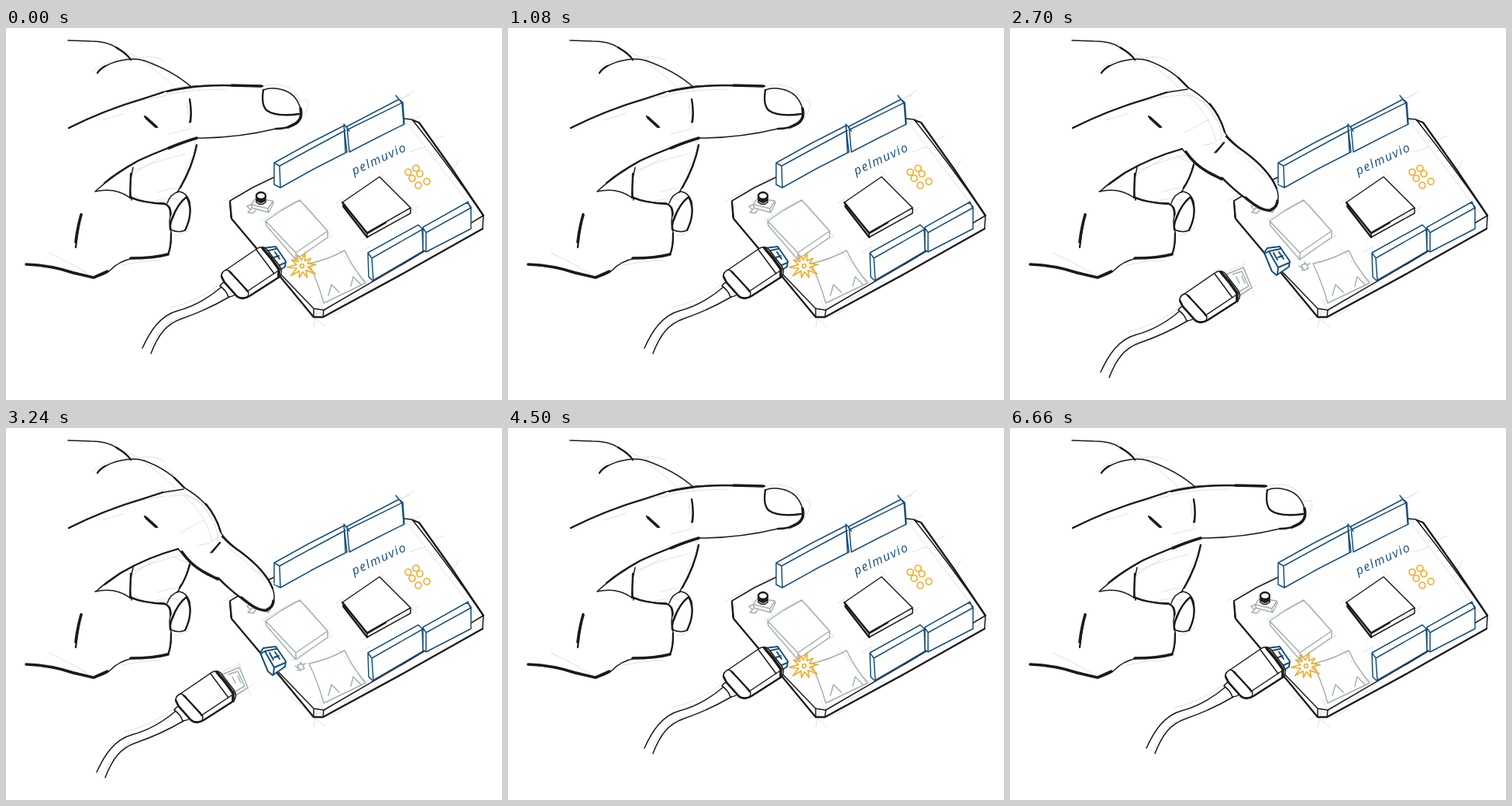
An HTML page for the animation above (8.1 s loop, 640 by 480 pixels).

```html
<!DOCTYPE html>
<html lang="en">
<head>
<meta charset="utf-8">
<title>Hold the button while plugging in</title>
<style>
html, body { margin: 0; width: 100%; height: 100%; overflow: hidden; background: #fff; }
svg { display: block; width: 100%; height: 100%; }
path, circle, ellipse { fill: none; stroke-linecap: round; stroke-linejoin: round; }
.ink { stroke: #1c1a1b; stroke-width: 1.5; }
.bold { stroke: #1c1a1b; stroke-width: 2.3; }
.heavy { stroke: #1c1a1b; stroke-width: 3.6; }
.blue { stroke: #174f7c; stroke-width: 1.5; }
.gray { stroke: #a3b0b0; stroke-width: 1.5; }
.gold { stroke: #f3ae2d; stroke-width: 1.7; }
.pencil { stroke: #dedede; stroke-width: .9; }
.paper { fill: #fff; }
text { font: italic 500 16px "Open Sans", sans-serif; letter-spacing: 1.5px; fill: #174f7c; }
</style>
</head>
<body>
<svg viewBox="0 0 640 480">
  <g id="board">
    <path class="pencil" d="M281 223L351 187M501 98L527 81M505 91L521 87M515 119L619 256M509 128L535 113M573 193L584 170M521 160L541 153M548 146L564 139M600 258L621 246M607 225L617 247M365 344L397 372M389 365L412 386M403 360L397 386M386 376L412 364M411 374L437 363M331 248L373 223M386 227L420 269M368 300L421 268M426 226L437 219M481 184L530 240M459 274L490 257M505 246L531 231M427 284L471 335M456 289L470 282M459 325L481 329M404 351L409 364M434 354L469 336M532 292L546 286"/>
    <path class="ink" d="M347 192L318 206L289 223L290 244M346 309L397 362L410 364L513 304L616 242L615 259M410 364L409 373M397 362V373M514 117L524 118Q571 177 616 242"/>
    <path class="bold" d="M289 224L291 246L344 309L397 373L409 373L512 317L615 259M525 119L533 122L575 181L616 242"/>

    <path class="blue paper" d="M346 174L391 149L436 126L440 160L397 182L354 206L346 202ZM346 174L353 178L354 206M353 178L397 154L438 132M436 125L438 160M440 127L507 92L512 96L514 124L478 142L443 160ZM441 131L512 96M503 87L511 97L513 123M436 124L443 133"/>
    <path class="blue paper" d="M467 290L532 254L537 259L538 288L473 326L468 321ZM467 290L472 297L474 326M472 297L537 260M538 257L595 225L600 231L600 259L542 289L538 286ZM538 258L542 264L542 288M542 264L600 232M596 224L600 234"/>

    <text transform="translate(449 190) rotate(-25)">pelmuvio</text>

    <g class="gold">
      <circle cx="519" cy="186" r="4"/><circle cx="529" cy="181" r="4"/>
      <circle cx="524" cy="194" r="4"/><circle cx="534" cy="188" r="4"/>
      <circle cx="532" cy="203" r="4"/><circle cx="543" cy="198" r="4"/>
    </g>

    <path class="gray" d="M335 249L356 235L379 222L415 262L374 290ZM335 250L336 255L374 299L374 290M374 299L415 270V262"/>
    <path class="ink" d="M434 225L482 192L522 232L466 264ZM434 225L437 233L466 270L522 239V232M466 264V270"/>
    <path class="bold" d="M434 225L466 265L490 251M435 230L466 270"/>
    <path class="gray" d="M391 304Q415 299 437 287Q447 309 464 329L410 355Q403 329 391 304M416 345L420 331L430 341M445 333L448 321L458 331"/>

    <path class="gray" d="M317 227L322 220L344 223L345 226L339 238L317 232ZM318 228L338 233L344 224M338 233V237M316 228L311 230L315 234M318 232L312 238L319 239L322 235"/>
    <path class="ink paper" d="M323 218V225Q329 230 335 225V218"/>
    <ellipse class="bold paper" cx="329" cy="216.500" rx="6" ry="4.500"/>
    <path class="heavy" d="M324.500 222Q329 226 333.500 222"/>

    <g class="blue" style="stroke-width:2">
      <path class="paper" d="M328 290L332 284L348 282L361 301L360 308L344 319L338 314Z"/>
      <path d="M329 291L334 288L349 285M334 288L346 309L360 303M346 309L345 318M340 290L345 299M347 289L353 298M346 296L352 294"/>
    </g>
  </g>

  <path id="lamp" class="gray" d="M376 306L382 304L385 310L379 313ZM373 307L377 310M380 302V305M384 305L387 304M376 313L379 311"/>

  <g id="glow" class="gold">
    <path id="spark" class="paper"/>
    <circle cx="382" cy="307" r="2.500" fill="#f3ae2d"/>
  </g>

  <g id="plug">
    <g id="tip">
      <path class="pencil" d="M328 286L362 274M352 318L377 300M359 271L374 313"/>
      <path class="gray paper" d="M338 287L360 278L371 304L352 316ZM346 287L358 283L367 302L355 309M351 290L355 298M358 289L362 298"/>
    </g>
    <path class="pencil" d="M212 361Q247 353 275 331M294 349L315 335M187 411Q203 378 231 371"/>
    <path class="ink" d="M277 335Q251 357 221 365C199 371 186 391 176 413M187 420C196 397 206 382 227 375Q259 364 288 347"/>
    <path class="ink paper" d="M276 333Q281 325 294 324L301 338Q297 346 287 347Q284 338 276 333M284 328Q292 333 296 344"/>
    <path class="ink paper" d="M278 322Q277 315 284 312L325 284Q331 281 336 285L353 307Q358 315 353 321L314 346Q304 352 298 347L281 328Z"/>
    <path class="ink" d="M284 312Q290 313 293 319L311 338Q315 342 311 348M311 340L350 314M323 286L346 317"/>
    <path class="bold" d="M278 320L282 328L298 346Q304 351 314 346L353 321M288 314Q299 325 312 340"/>
    <path class="heavy" d="M331 284Q342 296 352 311L352 321"/>
  </g>

  <g id="hand">
    <path class="pencil" d="M140 27Q161 31 173 40M162 41Q190 32 204 43M177 43Q201 59 221 80M111 57Q130 38 168 42M149 101Q179 91 205 88M124 119L152 110M165 184Q201 169 231 163M164 189Q180 177 198 168M196 212Q215 205 225 207M186 226Q205 216 222 222M218 267Q228 270 239 256M150 306Q178 300 200 300M55 290Q85 304 106 317M166 216Q178 225 193 227"/>
    <path class="ink" d="M80 16L109 17Q130 17 142 25Q157 34 161 41M118 58Q126 47 148 42Q164 38 178 42M81 129Q132 104 174 92L203 83"/>
    <path class="bold" d="M118 58Q121 53 128 49M142 25Q156 33 161 41M81 129Q124 107 178 91L202 83"/>
    <path class="ink" d="M115 211C133 207 149 211 160 219Q177 226 204 226Q213 229 213 240Q209 248 213 263Q214 281 209 292Q190 297 164 297Q145 301 134 313Q125 320 113 322Q71 309 26 305M164 180Q158 204 162 222"/>
    <path class="bold" d="M160 218Q178 226 205 227Q213 230 212 242M213 265Q213 284 209 292M161 188L160 219M179 114Q187 121 195 128M97 240Q92 262 90 283"/>
    <path class="heavy" d="M26 305Q58 306 87 316L113 322L131 314M97 241Q92 258 90 276M209 292Q191 297 161 297M181 116L193 127"/>
    <path class="ink" d="M208 226Q212 214 223 211Q233 212 237 224Q240 243 231 261Q222 265 212 260M233 218Q222 226 215 246Q211 253 213 260"/>
    <path class="bold" d="M233 218Q243 237 231 261M233 218Q222 226 214 246Q211 254 212 260"/>
  </g>

  <g id="raised">
    <path class="pencil" d="M203 87Q239 79 283 79M331 75Q350 70 365 77Q374 82 379 93M376 95L388 93Q394 102 382 116M334 80Q347 72 374 90M210 137L238 130M233 96L237 126M215 78L247 73M348 132Q365 129 375 124M231 184Q244 164 244 146"/>
    <path class="ink" d="M178 42Q215 55 239 76M201 83Q232 74 271 74L331 75M237 92Q240 108 237 122M332 80Q341 76 354 79Q374 83 380 104Q383 116 375 123Q365 130 348 130Q299 142 246 142Q208 154 171 171Q138 190 116 210M246 151Q241 178 221 212"/>
    <path class="bold" d="M208 82Q243 74 280 74L331 75M237 92Q240 108 238 121M332 80Q329 99 336 106Q348 115 378 111M246 142Q208 154 171 171Q142 187 127 200M246 151Q241 178 225 206M375 123Q365 130 348 130"/>
    <path class="heavy" d="M380 104Q383 117 374 123L364 128M246 142Q226 148 210 155M291 74L329 75"/>
  </g>

  <g id="pressing">
    <path class="paper" d="M222 156L229 78Q268 101 277 134L303 160Q338 188 344 207Q349 222 340 233Q330 239 318 230L274 195Z"/>
    <path class="pencil" d="M202 80Q225 80 242 91Q274 113 273 148M211 88Q251 80 265 119M229 86Q258 111 266 145M225 135L257 118M249 151Q267 151 277 136M286 154Q319 178 336 199M328 188L349 203M316 181L331 190M216 165Q225 173 238 174M204 49L222 65"/>
    <path class="ink" d="M178 42Q211 54 230 77Q268 99 277 134Q281 143 303 160Q337 186 344 207Q350 223 339 234Q329 238 317 229Q295 215 274 193Q256 195 222 156Q182 167 148 187Q130 198 116 211M276 148L264 161M237 175Q233 194 221 212M203 83L229 79"/>
    <path class="bold" d="M217 64L230 77M258 98Q271 114 277 134M279 140Q289 151 303 160Q335 184 344 207M237 177Q232 195 224 206M222 156Q182 167 148 187L127 202M276 148L266 160M274 194Q294 214 317 229"/>
    <path class="heavy" d="M227 160Q238 176 254 185L273 195M304 219Q325 237 336 235Q345 231 345 223"/>
  </g>
</svg>
<script>
const LOOP = 8100;
const byId = id => document.getElementById(id);
const show = (id, on) => byId(id).setAttribute("visibility", on ? "visible" : "hidden");

// Hand-drawn star: spikes of uneven length around the status light.
const points = Array.from({ length: 20 }, (_, i) => {
  const radius = i % 2 ? 7.5 : 17.5 + 2.5 * Math.sin(i * 2.3);
  const angle = i * Math.PI / 10 - 1.35;
  return [382 + radius * Math.cos(angle), 307 + radius * Math.sin(angle)].map(n => n.toFixed(1));
});
byId("spark").setAttribute("d", "M" + points.join("L") + "Z");

function draw(now) {
  const t = now % LOOP;
  const plugged = t < 1800 || t >= 3600;
  const pressing = t >= 2700 && t < 4500;
  show("glow", plugged);
  show("lamp", !plugged);
  show("tip", !plugged);
  byId("plug").setAttribute("transform", plugged ? "" : "translate(-59 31)");
  show("pressing", pressing);
  show("raised", !pressing);
}

const start = performance.now();
function tick() {
  draw(performance.now() - start);
  requestAnimationFrame(tick);
}
tick();
</script>
</body>
</html>
```
